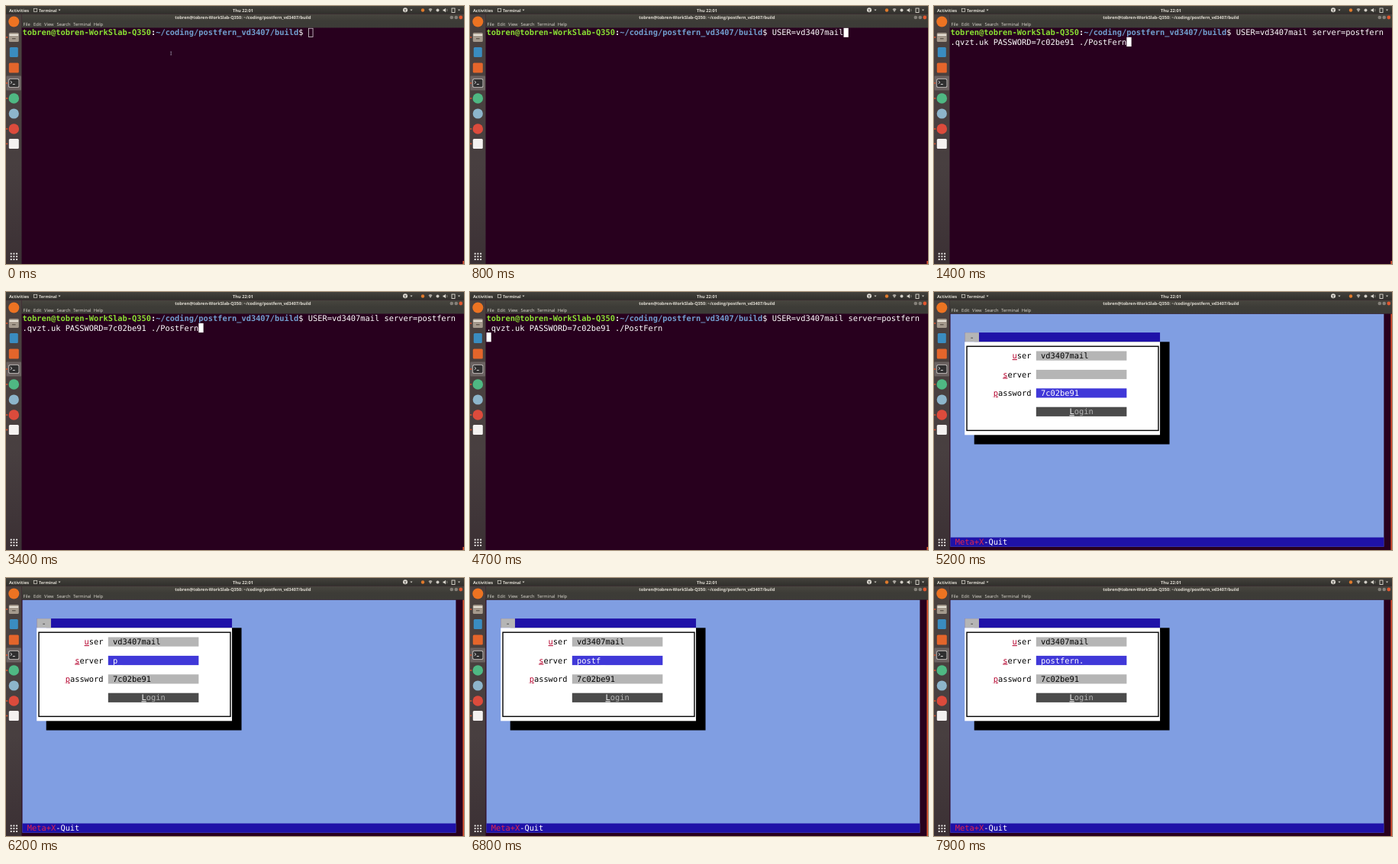
Animation of 600 by 338 pixels, one loop 8000 ms. Source, as an HTML page:

```html
<!DOCTYPE html>
<html lang="en">
<head>
<meta charset="utf-8">
<title>Terminal login</title>
<style>
  html, body { margin: 0; width: 100%; height: 100%; overflow: hidden; background: #28001e; }
  svg { display: block; width: 100%; height: 100%; }
  text { white-space: pre; text-rendering: geometricPrecision; }
  .ui { font: 5.75px "Open Sans", "Noto Sans", sans-serif; fill: #dfdbd2; }
  .bold { font-weight: 700; }
  .mono { font: 10.36px "DejaVu Sans Mono", monospace; fill: #fff; }
  .prompt { font-weight: 700; }
  .key { text-decoration: underline; }
</style>
</head>
<body>
<svg viewBox="0 0 600 338">
  <defs>
    <linearGradient id="dockFill" x2="0" y2="1">
      <stop offset="0" stop-color="#4a413e"/>
      <stop offset=".6" stop-color="#483f40"/>
      <stop offset="1" stop-color="#3b3034"/>
    </linearGradient>
    <linearGradient id="panelFill" x2="0" y2="1">
      <stop offset="0" stop-color="#43413c"/>
      <stop offset="1" stop-color="#302f2b"/>
    </linearGradient>
    <linearGradient id="barFill" x2="0" y2="1">
      <stop offset="0" stop-color="#48463f"/>
      <stop offset=".5" stop-color="#3d3c37"/>
      <stop offset="1" stop-color="#3c3b37"/>
    </linearGradient>
  </defs>
  <rect width="600" height="338" fill="#28001e"/>
  <g id="shell"></g>
  <g id="form"></g>
  <rect id="thumb" x="598.4" width="1.6" fill="#d9532f"/>
  <g id="desktop"></g>
</svg>
<script>
const $ = id => document.getElementById(id);
const CW = 6.24, RH = 12.2, COLS = 91, LOOP = 8000;
const X = col => 21.5 + col * CW;
const Y = row => 28.7 + row * RH;

const rect = (x, y, w, h, fill, more = '') =>
  `<rect x="${x}" y="${y}" width="${w}" height="${h}" fill="${fill}" ${more}/>`;
const dot = (x, y, r, fill) => `<circle cx="${x}" cy="${y}" r="${r}" fill="${fill}"/>`;
const path = (d, stroke, w = 1, fill = 'none') =>
  `<path d="${d}" stroke="${stroke}" stroke-width="${w}" fill="${fill}"/>`;
const label = (x, y, s, cls = '', more = '') => `<text class="ui ${cls}" x="${x}" y="${y}" ${more}>${s}</text>`;
const cells = (col, row, w, h, fill, more) => rect(X(col), Y(row), w * CW, h * RH, fill, more);
const mono = (col, row, s, fill = '#fff', cls = '') =>
  `<text class="mono ${cls}" x="${X(col)}" y="${Y(row) + 9.6}" style="fill:${fill}">${s}</text>`;
const span = (s, fill, cls = '') => `<tspan class="${cls}" style="fill:${fill}">${s}</tspan>`;

const login = 'tobren@tobren-WorkSlab-Q350';
const dir = '~/coding/postfern_vd3407/build';
const user = 'vd3407mail', pass = '7c02be91', host = 'postfern.';
const command = `USER=${user} server=postfern.qvzt.uk PASSWORD=${pass} ./PostFern`;
const promptLen = login.length + dir.length + 3;
const room = COLS - promptLen;

function drawDesktop() {
  const caret = x => path(`M${x} 4.5h3l-1.5 2z`, 'none', 0, '#d0ccc4');
  let s = rect(0, 0, 600, 10.5, 'url(#panelFill)') + rect(20.5, 10.5, 579.5, 18, 'url(#barFill)')
    + rect(0, 10.5, 20.5, 327.5, 'url(#dockFill)');

  s += label(4, 7.6, 'Activities', 'bold', 'style="font-size:5.6px"')
    + rect(36.3, 3.3, 4.4, 4, 'none', 'stroke="#dfdbd2" stroke-width=".7"')
    + label(43, 7.6, 'Terminal', 'bold', 'style="font-size:5.4px"') + caret(68.5)
    + label(310.5, 7.6, 'Thu 22:01', 'bold', 'text-anchor="middle" style="font-size:5.7px"')
    + label(310.5, 17.2, `${login}: ${dir}`, 'bold', 'text-anchor="middle" style="font-size:5.6px"');
  [[22.5, 'File'], [36, 'Edit'], [50, 'View'], [66.5, 'Search'], [88, 'Terminal'], [114.7, 'Help']]
    .forEach(([x, name]) => s += label(x, 26.1, name));

  // status indicators
  s += dot(523, 5.3, 3, '#e4e0d8') + path('M521.5 4.6h3M523 4.6v1.2l-1 1.8M523 5.8l1 1.8', '#2b2a27', .6)
    + caret(529.5) + dot(546, 5.5, 2.2, '#e07a2c')
    + path('M553.5 4.2q2.5-2.4 5 0l-2.5 3.8z', 'none', 0, '#a9a59e')
    + dot(565.5, 5.5, 2, '#d0ccc4')
    + path('M572.5 4.5h1.5l2-1.8v5.6l-2-1.8h-1.5z', 'none', 0, '#dfdbd2')
    + path('M577.3 3.8q1.3 1.7 0 3.4', '#a9a59e', .7)
    + rect(584, 3, 4, 5.5, 'none', 'stroke="#dfdbd2" stroke-width=".9"') + caret(592);
  s += dot(583.8, 15, 2.3, '#85817a') + dot(589.7, 15, 2.3, '#85817a') + dot(595.8, 15, 2.4, '#e2572f');

  // dock
  const tile = (y, fill, w = 13, h = 13) => rect(10.3 - w / 2, y - h / 2, w, h, fill, 'rx="1.5"');
  s += rect(.5, 91.5, 19.5, 19, '#6b6261', 'rx="1"');
  s += dot(10.3, 20.5, 7, '#ed7322')
    + tile(41, '#a59a8d', 13, 12) + rect(4.5, 37, 11.6, 2, '#e9e3d8') + rect(8, 42, 4.6, 1.4, '#655b52')
    + tile(60.5, '#3a8cc0', 11, 13) + tile(81, '#e4652b')
    + tile(101, '#c9c5c2', 14, 11.5) + tile(101, '#302f30', 12.4, 9.9)
    + path('M5.8 98.2l2 1.8-2 1.8M8.8 102.6h3', '#eee', .9)
    + dot(10.3, 121, 6.8, '#4fb883') + dot(10.3, 141, 6.6, '#8db5cb')
    + dot(10.3, 161, 6.8, '#dc4b3c') + tile(180.5, '#f4f1f0');
  [41, 101, 121, 161, 180.5].forEach(y => s += dot(1.2, y, 1, '#e2572f'));
  for (let i = 0; i < 9; i++)
    s += rect(5.7 + i % 3 * 3.7, 323.5 + Math.floor(i / 3) * 3.7, 2, 2, '#f2f0ee', 'rx=".6"');
  $('desktop').innerHTML = s;
}

function shell(t) {
  const typed = t < 800 ? 0 : t < 1300 ? 15 : t < 1400 ? room : command.length;
  const entered = t >= 4700;
  let s = '';
  if (t < 4900) {
    const line = span(login, '#8ae234', 'prompt') + span(':', '#fff', 'prompt')
      + span(dir, '#729fcf', 'prompt') + '$ ' + command.slice(0, Math.min(typed, room));
    s += mono(0, 0, line) + mono(0, 1, command.slice(room, Math.max(typed, room)));
  }
  const at = entered ? 2 * COLS : promptLen + typed;
  const col = at % COLS, row = Math.floor(at / COLS);
  s += t < 100
    ? rect(X(col) + .5, Y(row) + .5, CW - .6, RH - 1, 'none', 'stroke="#d8d2d6" stroke-width=".8"')
    : cells(col, row, 1, 1, '#fff');
  if (t < 800) s += path('M215.3 60h1.8M216.2 60v4M215.3 64h1.8', '#9a93a8', .7);
  return s;
}

function form(t) {
  const onServer = t >= 5700;
  const count = t < 6200 ? 0 : Math.min(host.length, Math.floor((t - 6200) / 150) + 1);
  const field = (row, col, name, value, focus) =>
    mono(col, row, span(name[0], '#b4002c', 'key') + name.slice(1), '#000')
    + cells(18, row, 19, 1, focus ? '#4038d8' : '#b5b5b5')
    + mono(19, row, value, focus ? '#fff' : '#000');
  return cells(0, 0, COLS, 25, '#809ee2')
    + cells(5, 3, 41, 11, '#000')
    + cells(3, 2, 41, 1, '#1f12a8') + cells(3, 2, 3, 1, '#b5b5b5') + mono(4, 2, '-', '#333')
    + cells(3, 3, 41, 10, '#fff')
    + rect(43, 71.2, 251, 110.2, 'none', 'stroke="#000" stroke-width="1.4"')
    + field(4, 13, 'user', user, false)
    + field(6, 11, 'server', onServer ? host.slice(0, count) + '_' : '', onServer)
    + field(8, 9, 'password', pass, !onServer)
    + cells(18, 10, 19, 1, '#4b4b4b')
    + mono(25, 10, span('L', '#fff', 'key') + 'ogin', '#b5b5b5')
    + cells(0, 24, COLS, 1, '#1f12a8')
    + mono(1, 24, span('Meta+X', '#e0264c') + '-Quit');
}

let last = -1;
function frame(now) {
  const t = Math.floor(now % LOOP / 100) * 100;
  if (t !== last) {
    last = t;
    const open = t >= 5200;
    $('shell').innerHTML = open ? '' : shell(t);
    $('form').innerHTML = open ? form(t) : '';
    const top = t < 4900 ? 334 : 28.5;
    $('thumb').setAttribute('y', top);
    $('thumb').setAttribute('height', 338 - top);
  }
  requestAnimationFrame(frame);
}

drawDesktop();
frame(0);
</script>
</body>
</html>
```
